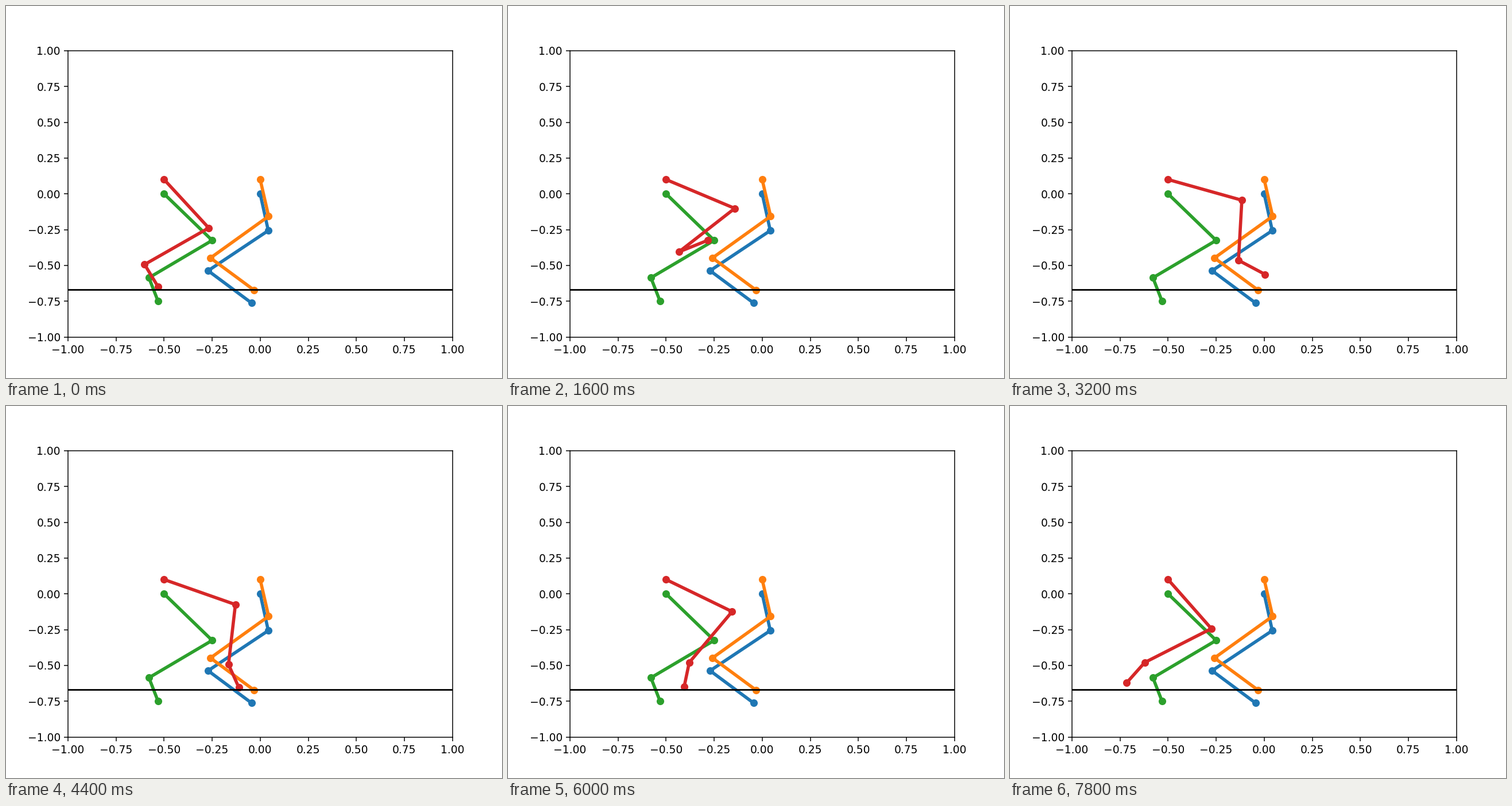
Animation, 864 px wide and 648 px high, one loop 8 s. Source, as a matplotlib script:

```python
import numpy as np
import matplotlib.pyplot as plt
from matplotlib.animation import FuncAnimation

STEPS = 40
STEP_MS = 200
FRONT = (0.26, 0.42, 0.32)
HIND = (0.41, 0.42, 0.17)

# Key poses of the walking leg: step, then hip, knee and ankle in degrees.
POSES = np.array([
    (1, -55.5, -87.1, 76.8),
    (6, -47.5, -89.3, 124),
    (8, -29.4, -104.3, 162),
    (13, -18.8, -89.2, 90.5),
    (16, -20.6, -71.8, 57),
    (19, -24, -62, 25.8),
    (22, -25.2, -69.7, 23.4),
    (34, -41.3, -92.9, 23.5),
    (39, -56.7, -89, 22.2),
])
KEYS, JOINTS = POSES[:, 0], POSES[:, 1:]
SPEEDS = np.gradient(JOINTS, KEYS, axis=0)


def pose(t):
    """Joint angles at step t, eased between key poses (cubic Hermite)."""
    i = min(np.searchsorted(KEYS, t, side="right"), len(KEYS) - 1) - 1
    h = KEYS[i + 1] - KEYS[i]
    u = (t - KEYS[i]) / h
    ease = u * u * (3 - 2 * u)
    return (JOINTS[i] * (1 - ease) + JOINTS[i + 1] * ease
            + h * u * (1 - u) * ((1 - u) * SPEEDS[i] - u * SPEEDS[i + 1]))


def leg(x, y, lengths, joints):
    """Points of a chain of links; each joint turns relative to the last."""
    chain = np.array(lengths) * np.exp(1j * np.radians(np.cumsum(joints)))
    points = complex(x, y) + np.cumsum(np.r_[0, chain])
    return points.real, points.imag


def walking_leg(step):
    return leg(-0.5, 0.1, HIND, pose(max(step, 1)))


fig, ax = plt.subplots(figsize=(6.4, 4.8), dpi=135)
ax.set_xlim(-1, 1)
ax.set_ylim(-1, 1)

style = dict(marker="o", lw=3)
ax.plot(*leg(0, 0, FRONT, (-80.7, -57.5, 93.3)), **style)
ax.plot(*leg(0, 0.1, FRONT, (-80.3, -55.8, 91.4)), **style)
ax.plot(*leg(-0.5, 0, HIND, (-52.4, -89.2, 67.8)), **style)
moving, = ax.plot(*walking_leg(0), **style)
ax.plot([-1, 1], [-0.67, -0.67], color="black", lw=1.5)


def update(step):
    moving.set_data(*walking_leg(step))
    return moving,


anim = FuncAnimation(fig, update, frames=STEPS, interval=STEP_MS,
                     repeat=True, repeat_delay=0)
plt.show()
```
